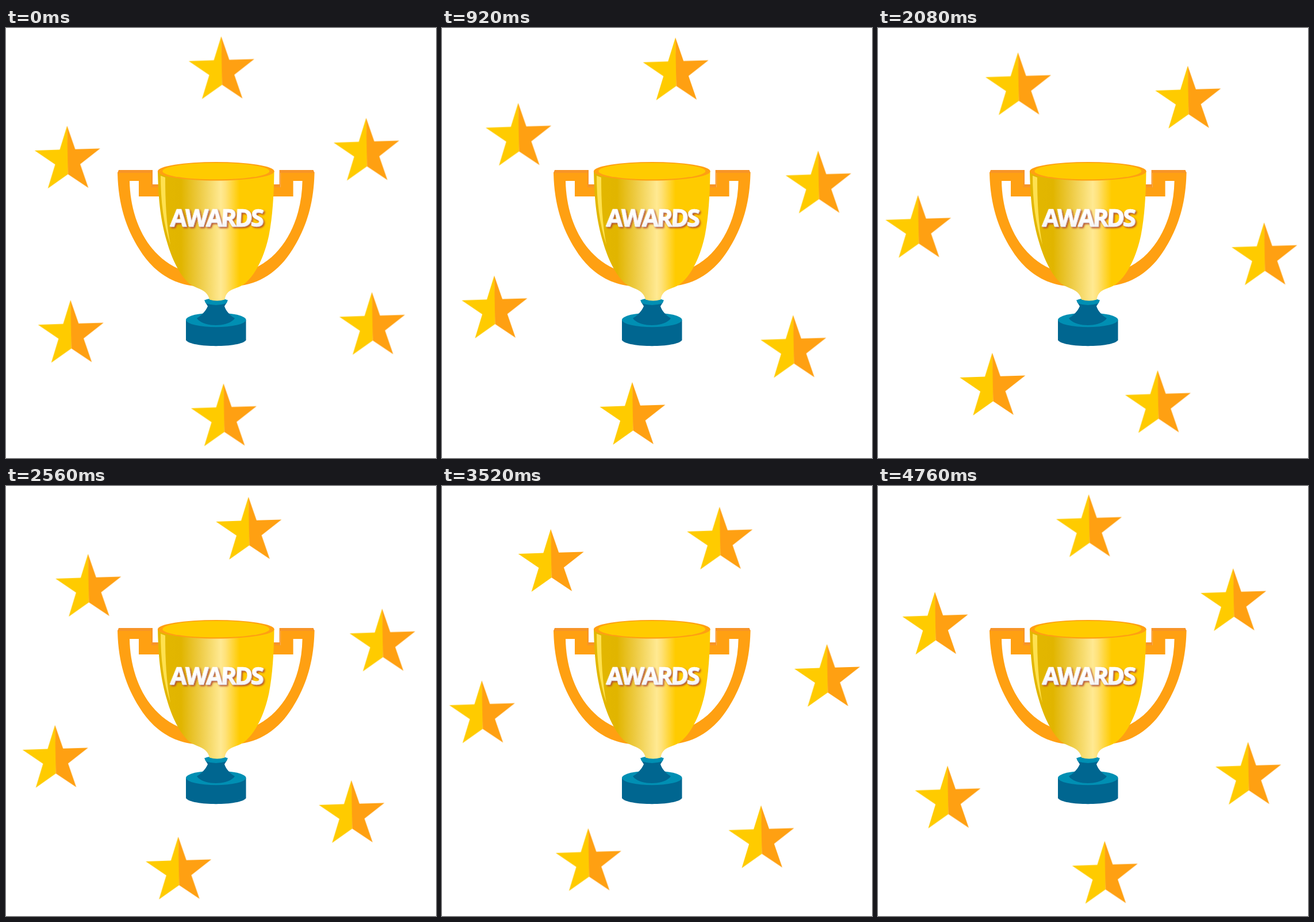
These frames come from a looping animation (748x748 px, 4800 ms). An HTML page:

```html
<!DOCTYPE html>
<html lang="en">
<head>
<meta charset="utf-8">
<title>Awards</title>
<style>
  html, body { margin: 0; width: 100%; height: 100%; overflow: hidden; background: #fff; }
  svg { display: block; width: 100vw; height: 100vh; }
  .gold { fill: #ffcb00; }
  .orange { fill: #ffa012; }
  .edge { fill: #f79428; }
  .teal { fill: #008fb3; }
  .navy { fill: #006690; }
  .title {
    font: 700 41.5px "Open Sans", "Noto Sans", sans-serif;
    font-kerning: none;
    letter-spacing: -3.1px;
    fill: url(#silver);
    stroke: #fff;
    stroke-width: .7px;
    filter: drop-shadow(1px 1px 0 #d3cfd8) drop-shadow(2px 2px 1.5px #b0452ce8);
  }
</style>
</head>
<body>
<svg viewBox="0 0 748 748">
  <defs>
    <linearGradient id="metal" gradientUnits="userSpaceOnUse" x1="264" y1="0" x2="467" y2="0">
      <stop offset="0" stop-color="#e3b700"/>
      <stop offset=".2" stop-color="#e1b500"/>
      <stop offset=".35" stop-color="#edca40"/>
      <stop offset=".54" stop-color="#ffe992"/>
      <stop offset=".58" stop-color="#ffe27a"/>
      <stop offset=".7" stop-color="#ffcb00"/>
      <stop offset="1" stop-color="#ffcb00"/>
    </linearGradient>
    <linearGradient id="silver" x1="0" y1="0" x2="0" y2="1">
      <stop offset=".5" stop-color="#fff"/>
      <stop offset="1" stop-color="#ecebf0"/>
    </linearGradient>
    <g id="star">
      <path class="gold" d="M0 0L-12.8 41.6L-56.5 43L-20.8 67.3L-33.5 109L1.5 84.2L2 60Z"/>
      <path class="orange" d="M0 0L14.1 40.8L57.5 39.5L22.8 66.7L37 108L1.5 84.2Z"/>
    </g>
    <g id="handle">
      <path class="orange" d="M194 251H253V277H268V293H231V266H215C216 331 245 399 308 422L330 449C290 446 256 424 232 385C208 347 195 305 194 251Z"/>
      <path class="edge" d="M196 247H255V272H268V277H253V252H194Z"/>
    </g>
  </defs>

  <use href="#handle"/>
  <use href="#handle" transform="matrix(-1 0 0 1 730.6 0)"/>

  <path class="navy" d="M313 508V543C322 556.5 408.500 556.5 417.500 543V508Z"/>
  <ellipse class="teal" cx="365.250" cy="507.700" rx="52.250" ry="12.5"/>
  <path class="navy" d="M346 476L351 484C347 493 340 500 332 505C343 521 387 521 398 505C390 500 383 493 380 484L385 476Z"/>
  <path class="teal" d="M345 473.5Q365 466 386 473.5L383 479Q365 485 348 479Z"/>

  <path fill="url(#metal)" d="M264 249C265 300 269 335 280 372C289 403 302 429 318 444C328 452 340 453 347 460C351 464 353 468 354 472.5Q367 476.5 380.5 472.5C381 467 383 463 387 459C394 453 406 452 416 444C435 428 450 396 457.5 360C464 326 466 290 466.5 249Z"/>
  <path fill="#ffe14f" d="M269 257L277 260C277 302 279 342 286 377C274 342 269 300 269 257Z"/>
  <ellipse class="orange" cx="365.300" cy="249.200" rx="101.300" ry="16.300"/>
  <ellipse class="gold" cx="365.300" cy="249" rx="93" ry="14.300"/>

  <text class="title" transform="translate(285 345) skewX(-3)">AWARDS</text>
  <g id="ring"></g>
</svg>
<script>
  const STEPS = 120, TICK = 40;
  const CX = 370.4, CY = 316.5, R = 302;
  const FIRST = 0.75, SWEEP = 358.5;   // the step across the top is a short one
  const PHASES = [0, 19, 39, 59, 79, 99];

  const ring = document.getElementById('ring');

  function pose(n) {
    const a = (FIRST + SWEEP * n / (STEPS - 1)) * Math.PI / 180;
    const x = CX + R * Math.sin(a), y = CY - R * Math.cos(a);
    return `translate(${x.toFixed(2)}px, ${y.toFixed(2)}px)`;
  }

  const orbit = Array.from({ length: STEPS + 1 }, (_, n) => ({
    offset: n / STEPS,
    transform: pose(n % STEPS),
    easing: 'step-end'
  }));

  for (const phase of PHASES) {
    const star = document.createElementNS('http://www.w3.org/2000/svg', 'use');
    star.setAttribute('href', '#star');
    ring.append(star);
    star.animate(orbit, {
      duration: STEPS * TICK,
      delay: -phase * TICK,
      iterations: Infinity
    });
  }
</script>
</body>
</html>
```
